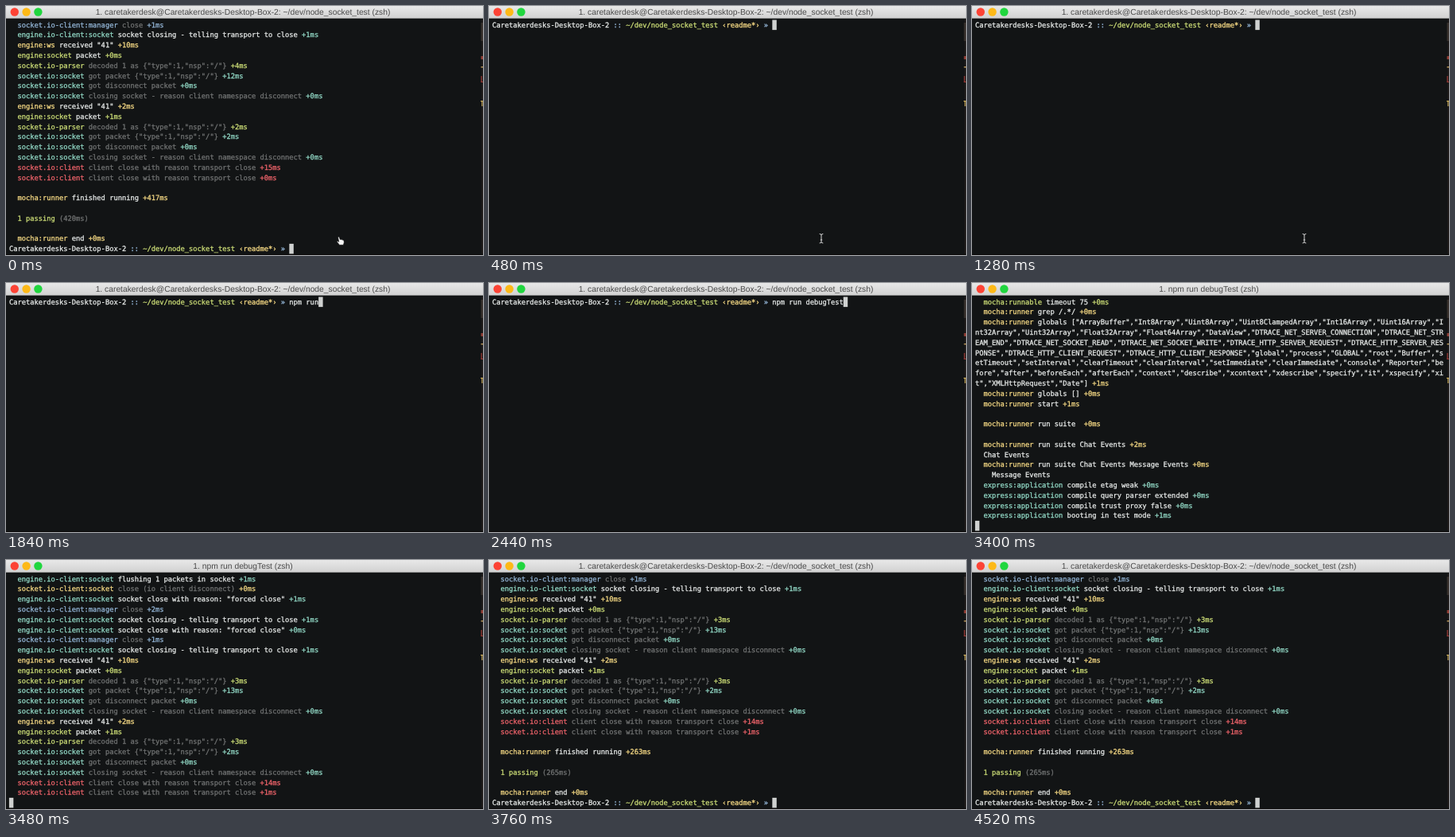
Animation of 600x313 px, one loop 4.56 s. Source, as an HTML page with a canvas:

```html
<!DOCTYPE html>
<html lang="en">
<head>
<meta charset="utf-8">
<title>Terminal test run</title>
<style>
html, body { margin: 0; width: 100%; height: 100%; overflow: hidden; background: #121415; }
canvas { display: block; }
</style>
</head>
<body>
<canvas id="stage" width="600" height="313"></canvas>
<script>
const ctx = document.getElementById('stage').getContext('2d');
const LOOP = 4560, COLS = 112, ROWS = 23;
const LEFT = 3.9, TOP = 17.5, CELL = 5.26, PITCH = 12.79;
const MONO = '8.74px "DejaVu Sans Mono", monospace';
const SANS = '10.3px "Liberation Sans", Arial, sans-serif';

const white = '#e6e9e8', gray = '#707272', teal = '#92d9c6', yellow = '#f4d883',
      lime = '#cbdc76', blue = '#93b5d6', red = '#ee636a';

const USER = 'caretakerdesk', HOST = 'Caretakerdesks-Desktop-Box-2', CMD = 'npm run debugTest';
const IDLE_TITLE = `1. ${USER}@${HOST}: ~/dev/node_socket_test (zsh)`;
const BUSY_TITLE = `1. ${CMD} (zsh)`;

// A line is a list of [text, colour] runs.
const plain = text => [[text, white]];
const prompt = (cmd = '') => [
  [HOST + ' ', white], [':: ', blue], ['~/dev/node_socket_test ', lime],
  ['‹readme*› ', yellow], ['» ', blue], [cmd, white]
];
const debug = (color, name, msg, ms) => [
  [`  ${name} `, color],
  [msg + ' ', name.startsWith('socket.io') ? gray : white],
  [`+${ms}ms`, color]
];
const runner = (msg, ms) => debug(yellow, 'mocha:runner', msg, ms);
const suite = (msg, ms) => debug(teal, 'mocha:suite', msg, ms);
const express = (msg, ms) => debug(teal, 'express:application', msg, ms);
const engineClient = (msg, ms) => debug(teal, 'engine.io-client:socket', msg, ms);
const manager = ms => debug(blue, 'socket.io-client:manager', 'close', ms);
const client = ms => debug(red, 'socket.io:client', 'client close with reason transport close', ms);
const closing = () => engineClient('socket closing - telling transport to close', 1);

const disconnect = (ws, packet, parse, got) => [
  debug(yellow, 'engine:ws', 'received "41"', ws),
  debug(lime, 'engine:socket', 'packet', packet),
  debug(lime, 'socket.io-parser', 'decoded 1 as {"type":1,"nsp":"/"}', parse),
  debug(teal, 'socket.io:socket', 'got packet {"type":1,"nsp":"/"}', got),
  debug(teal, 'socket.io:socket', 'got disconnect packet', 0),
  debug(teal, 'socket.io:socket', 'closing socket - reason client namespace disconnect', 0)
];
const ending = (parse1, got1, parse2, close1, close2, ran, total) => [
  manager(1), closing(),
  ...disconnect(10, 0, parse1, got1),
  ...disconnect(2, 1, parse2, 2),
  client(close1), client(close2),
  [], runner('finished running', ran),
  [], [['  1 passing ', lime], [`(${total}ms)`, gray]],
  [], runner('end', 0)
];

const globals = `ArrayBuffer Int8Array Uint8Array Uint8ClampedArray Int16Array Uint16Array
  Int32Array Uint32Array Float32Array Float64Array DataView DTRACE_NET_SERVER_CONNECTION
  DTRACE_NET_STREAM_END DTRACE_NET_SOCKET_READ DTRACE_NET_SOCKET_WRITE
  DTRACE_HTTP_SERVER_REQUEST DTRACE_HTTP_SERVER_RESPONSE DTRACE_HTTP_CLIENT_REQUEST
  DTRACE_HTTP_CLIENT_RESPONSE global process GLOBAL root Buffer setTimeout setInterval
  clearTimeout clearInterval setImmediate clearImmediate console Reporter before after
  beforeEach afterEach context describe xcontext xdescribe specify it xspecify xit
  XMLHttpRequest Date`.split(/\s+/);

// Breaks long lines into screen rows.
function wrap(line) {
  const rows = [[]];
  let col = 0;
  for (let [text, color] of line) {
    while (text) {
      if (col === COLS) { rows.push([]); col = 0; }
      const part = text.slice(0, COLS - col);
      rows[rows.length - 1].push([part, color]);
      col += part.length;
      text = text.slice(part.length);
    }
  }
  return rows;
}

const oldRun = [...ending(4, 12, 2, 15, 0, 417, 420), prompt()];
const newRun = [
  prompt(CMD), [],
  plain(`> node_socket_test@0.0.0 debugTest /Users/${USER}/dev/node_socket_test`),
  plain('> DEBUG=* mocha test'), [],
  suite('bail undefined', 0), suite('enableTimeouts true', 7),
  suite('timeout 15000', 5), suite('bail true', 1),
  debug(lime, 'mocha:runnable', 'timeout 75', 0),
  runner('grep /.*/', 0), runner('globals ' + JSON.stringify(globals), 1),
  runner('globals []', 0), runner('start', 1),
  [], runner('run suite ', 0),
  [], runner('run suite Chat Events', 2), plain('  Chat Events'),
  runner('run suite Chat Events Message Events', 0), plain('    Message Events'),
  express('compile etag weak', 0), express('compile query parser extended', 0),
  express('compile trust proxy false', 0), express('booting in test mode', 1),
  engineClient('flushing 1 packets in socket', 1),
  debug(yellow, 'socket.io-client:socket', 'close (io client disconnect)', 0),
  engineClient('socket close with reason: "forced close"', 1),
  manager(2), closing(),
  engineClient('socket close with reason: "forced close"', 0),
  ...ending(3, 13, 3, 14, 1, 263, 265)
].flatMap(wrap);

// [time, rows printed so far]
const steps = [[2600, 1], [2800, 5], [3040, 9], [3320, 11], [3360, 27],
               [3400, 31], [3440, 41], [3480, 53], [3520, 59]];
const CLEAR = 320, TYPE = 1480, KEY = 54, DONE = 3560;

function screenAt(t) {
  if (t < CLEAR) return oldRun;
  if (t < steps[0][0]) {
    const typed = Math.max(0, Math.floor((t - TYPE) / KEY) + 1);
    return [prompt(CMD.slice(0, typed))];
  }
  const count = steps.filter(s => s[0] <= t).pop()[1];
  return [...newRun.slice(0, count), t < DONE ? [] : prompt()].slice(-ROWS);
}

function rect(color, x, y, w, h) {
  ctx.fillStyle = color;
  ctx.fillRect(x, y, w, h);
}

function drawRow(line, row) {
  let x = LEFT;
  const y = TOP + row * PITCH + 9.2;
  for (const [text, color] of line) {
    ctx.fillStyle = ctx.strokeStyle = color;
    for (const ch of text) {
      if (ch !== ' ') {
        ctx.fillText(ch, x, y);
        ctx.strokeText(ch, x, y);
      }
      x += CELL;
    }
  }
  return x;
}

function drawWindow(title) {
  rect('#121415', 0, 0, 600, 313);
  rect('#0b0909', 0, 312, 600, 1);
  const bar = ctx.createLinearGradient(0, 0, 0, 16);
  bar.addColorStop(0, '#e8e8e8');
  bar.addColorStop(1, '#d0d0d0');
  rect(bar, 0, 0, 600, 15.6);
  ['#fc4335', '#fdb917', '#20d63e'].forEach((color, i) => {
    ctx.fillStyle = color;
    ctx.beginPath();
    ctx.arc(10.8 + i * 14.8, 7.5, 5.2, 0, 7);
    ctx.fill();
  });
  ctx.font = SANS;
  ctx.textAlign = 'center';
  ctx.fillStyle = '#4a4a4a';
  ctx.fillText(title, 298, 11.3);

  // sliver of the window behind
  rect('#1c1918', 598, 17, 2, 294);
  rect('#38302c', 597.5, 21, 2.5, 23);
  rect('#933f36', 597.5, 63, 2.5, 4);
  rect('#b79558', 597.5, 76, 2.5, 1.5);
  rect('#a23b37', 597.5, 88, 1.2, 8);
  rect('#a23b37', 597.5, 95, 2.5, 1);
  rect('#c9ac5a', 597, 119, 3, 1.2);
  rect('#c9ac5a', 598.3, 119, 1.2, 7);
}

const hand = new Path2D('M417.5 290.5q1.3-1 1.9.5l1 2.6q1-.8 1.7.2 1-.6 1.6.4 1.2-.3 1.4 1l.2 2.2-1 3h-4.8l-3.2-4q.4-1.4 1.8-.4l.6.4z');
const beam = new Path2D('M415.7 286.5q2.3 0 2.3 1.5 0-1.5 2.3-1.5M418 288v8.5M415.7 298q2.3 0 2.3-1.5 0 1.5 2.3 1.5M416.8 294h2.4');

function drawPointer(t) {
  if (t < CLEAR) {
    ctx.fillStyle = '#f5f5f5';
    ctx.strokeStyle = '#000';
    ctx.lineWidth = 0.6;
    ctx.fill(hand);
    ctx.stroke(hand);
  } else if (t < TYPE) {
    ctx.strokeStyle = '#d8d8d8';
    ctx.lineWidth = 1;
    ctx.stroke(beam);
  }
}

function draw(t) {
  const busy = t >= steps[0][0] && t < DONE;
  drawWindow(busy ? BUSY_TITLE : IDLE_TITLE);
  ctx.font = MONO;
  ctx.textAlign = 'left';
  ctx.lineWidth = 0.3;
  const rows = screenAt(t);
  let end = LEFT;
  rows.forEach((line, i) => { end = drawRow(line, i); });
  rect('#cfd1d0', end, TOP + (rows.length - 1) * PITCH, CELL + 0.2, 12.6);
  drawPointer(t);
}

ctx.textRendering = 'geometricPrecision';
const start = performance.now();
function tick() {
  draw((performance.now() - start) % LOOP);
  requestAnimationFrame(tick);
}
tick();
</script>
</body>
</html>
```
